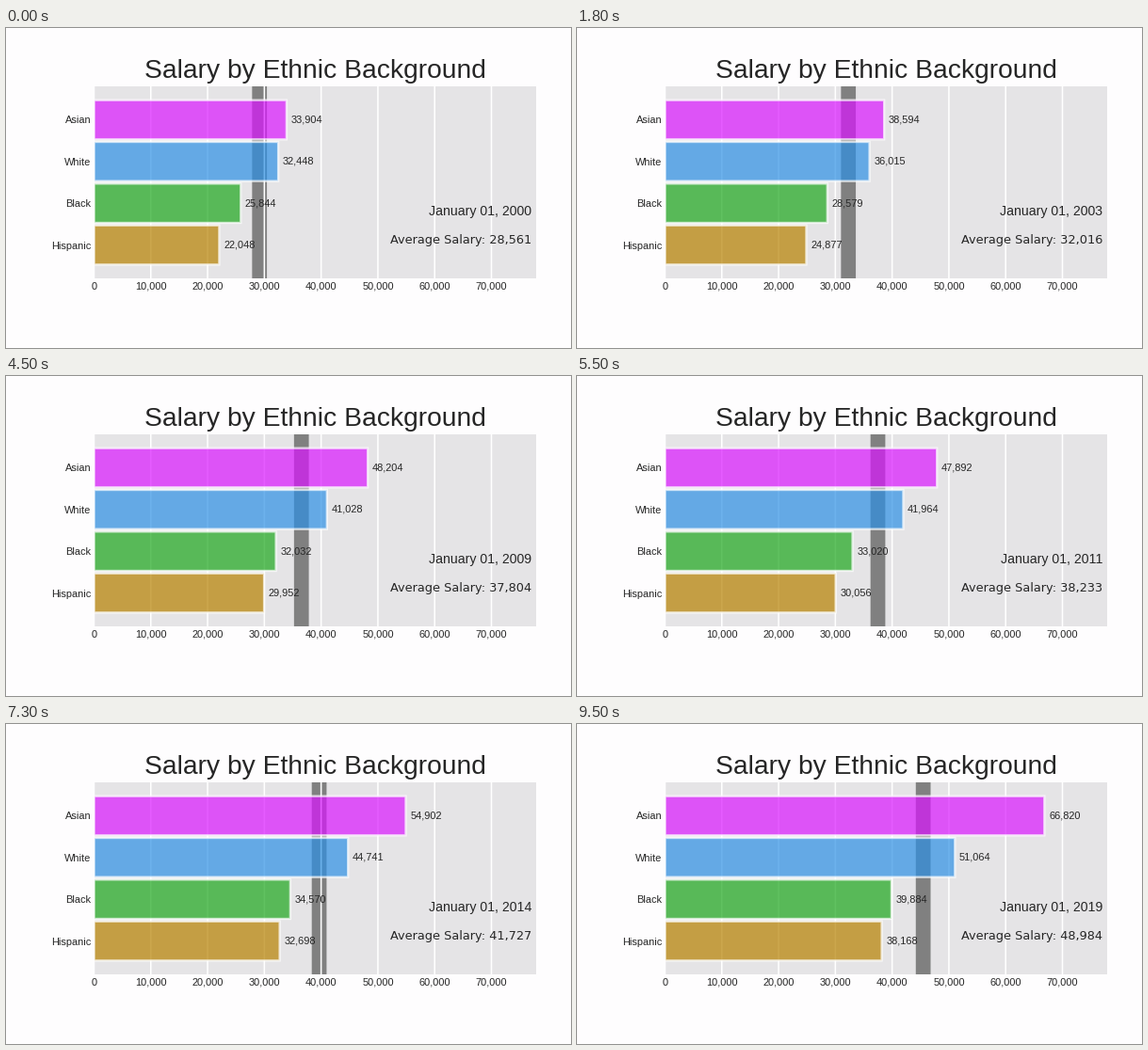
Recreate the animation shown at these times as a matplotlib script. Size 600 by 340 pixels, loop 9600 ms.

```python
import numpy as np
import matplotlib.pyplot as plt
from matplotlib.animation import FuncAnimation

W, H, DPI = 600, 340, 100
PT = 1.132                      # overall scale of type and line sizes
STEPS = 5                       # frames per year
FIRST_YEAR = 2000
INK = "#262626"

plt.rcParams["font.family"] = "Liberation Sans"
plt.rcParams["text.color"] = INK

# Median weekly pay per year, smallest group first
GROUPS = ["Hispanic", "Black", "White", "Asian"]
COLORS = ["#B68100", "#1CA71C", "#2E91E5", "#DA16FF"]
WEEKLY = np.array([
    [424, 443, 451, 470, 484, 497, 507, 524, 557, 576,
     567, 578, 594, 601, 621, 634, 658, 688, 711, 734],
    [497, 516, 524, 543, 554, 550, 583, 599, 612, 616,
     629, 635, 643, 652, 663, 666, 704, 707, 722, 767],
    [624, 647, 663, 680, 701, 715, 731, 756, 778, 789,
     797, 807, 825, 835, 849, 868, 895, 923, 951, 982],
    [652, 677, 697, 732, 749, 800, 840, 892, 915, 927,
     906, 921, 984, 1012, 1027, 1075, 1113, 1143, 1198, 1285],
])
YEARLY = WEEKLY * 52
N_YEARS = YEARLY.shape[1]
FRAMES = (N_YEARS - 1) * STEPS + 1
X_MAX = YEARLY.max() * 1.05 * 1.11

fig = plt.figure(figsize=(W / DPI, H / DPI), dpi=DPI, facecolor="#fefdfe")
left, right, top, bottom = 93.5, 563, 62, 266
ax = fig.add_axes([left / W, 1 - bottom / H,
                   (right - left) / W, (bottom - top) / H])
ax.set_facecolor("#e5e4e6")
for spine in ax.spines.values():
    spine.set_visible(False)

ax.set_xlim(0, X_MAX)
ax.set_ylim(0.2, 4.8)
ax.set_axisbelow(True)
ax.grid(True, axis="x", color="white", lw=1.0 * PT, snap=False)
ax.set_xticks(range(0, 70001, 10000))
ax.xaxis.set_major_formatter("{x:,.0f}")
rows = np.arange(1, len(GROUPS) + 1)
ax.set_yticks(rows, GROUPS)
ax.tick_params(length=0, labelsize=7 * PT, labelcolor=INK)
ax.tick_params(axis="x", pad=2.4 * PT)
ax.tick_params(axis="y", pad=2 * PT)
ax.set_title("Salary by Ethnic Background", fontsize=18 * PT, pad=6 * PT)

median_line = ax.axvline(0, color="0.5", lw=10 * PT, zorder=0.5, snap=False)
bars = ax.barh(rows, YEARLY[:, 0], height=0.94, color=COLORS, alpha=0.7,
               ec="white", lw=1.5 * PT, snap=False)
labels = [ax.text(0, y, "", fontsize=7 * PT, va="center") for y in rows]


def corner_text(y, **style):
    return ax.text(0.99, y, "", transform=ax.transAxes,
                   ha="right", va="center", **style)


date_text = corner_text(0.35, fontsize=9 * PT)
mean_text = corner_text(0.2, fontsize=8.23 * PT, family="DejaVu Sans")


def update(i):
    t = i / STEPS
    pay = [np.interp(t, range(N_YEARS), row) for row in YEARLY]
    for bar, label, value in zip(bars, labels, pay):
        bar.set_width(value)
        label.set_x(value + 0.01 * X_MAX)
        label.set_text(f"{value:,.0f}")
    mid = np.median(pay)
    median_line.set_xdata([mid, mid])
    date_text.set_text(f"January 01, {FIRST_YEAR + i // STEPS}")
    mean_text.set_text(f"Average Salary: {np.mean(pay):,.0f}")
    return [*bars, *labels, median_line, date_text, mean_text]


anim = FuncAnimation(fig, update, frames=FRAMES, interval=100,
                     init_func=lambda: update(0), repeat=True, repeat_delay=0)
plt.show()
```
